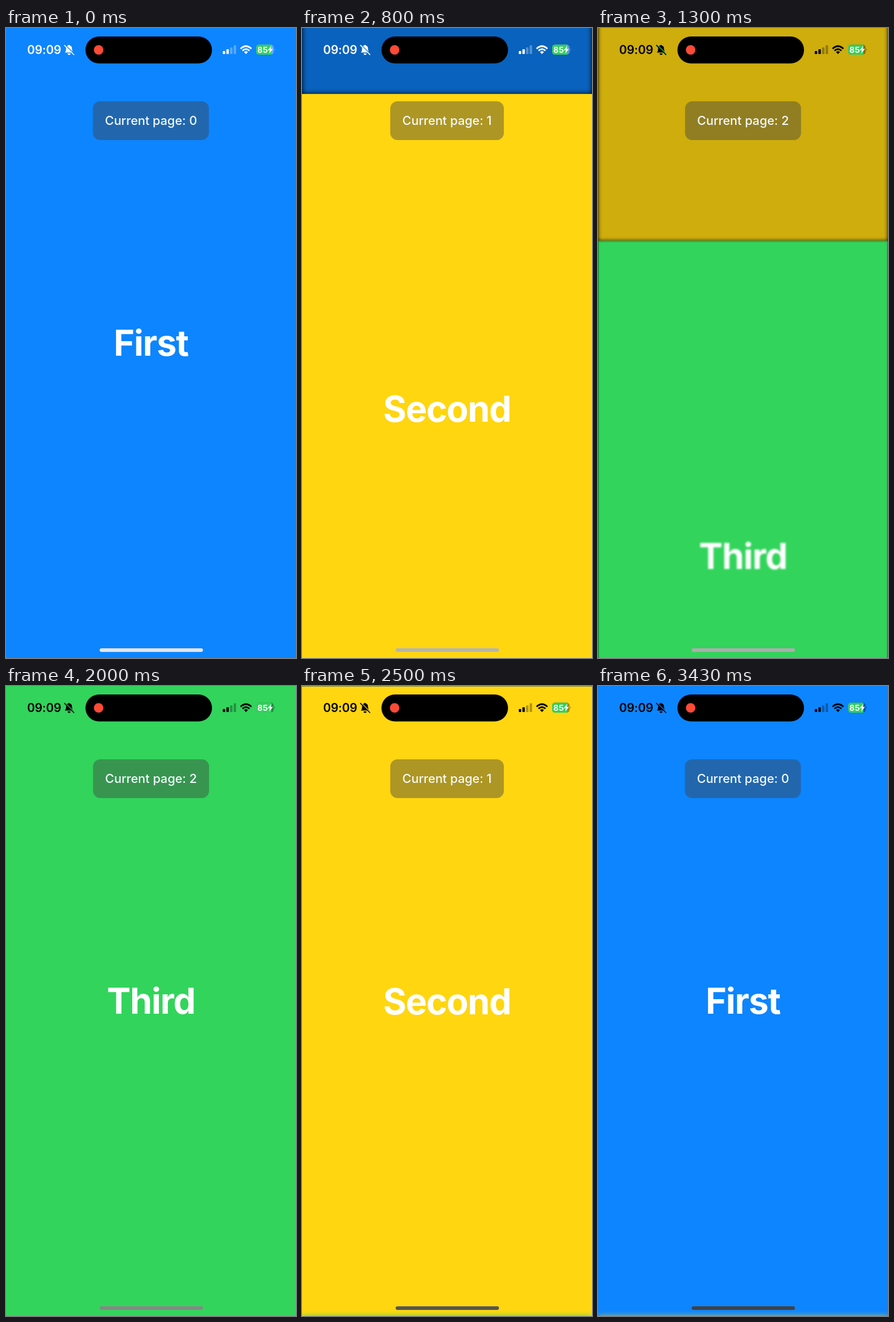
Animation of 480x1040 px, one loop 3570 ms. Source, as an HTML page:

```html
<!DOCTYPE html>
<html lang="en">
<head>
<meta charset="utf-8">
<title>Vertical pager</title>
<style>
  html, body { margin: 0; width: 100%; height: 100%; overflow: hidden; background: #000; }
  body { position: relative; font-family: Inter, "Open Sans", sans-serif; }
  .page {
    position: absolute; left: 0; top: 0; width: 480px; height: 1040px;
    color: #fff; font-size: 59px; font-weight: 700; letter-spacing: -1.2px;
    line-height: 1040px; text-align: center;
  }
  #label {
    position: absolute; left: 50%; top: 121px; height: 64px; padding: 0 20px;
    transform: translateX(-50%); border-radius: 12px;
    background: rgba(65, 65, 65, .426); color: #f4faff;
    font-size: 20.3px; font-weight: 500; line-height: 64px; white-space: nowrap;
  }
  svg { position: absolute; left: 0; top: 0; }
</style>
</head>
<body>
<div class="page" style="background:#0d85ff">First</div>
<div class="page" style="background:#ffd610">Second</div>
<div class="page" style="background:#32d45c">Third</div>
<div id="label"></div>

<svg width="480" height="1040">
  <rect x="131.5" y="14" width="209.5" height="44.5" rx="22.2"/>
  <circle cx="153.3" cy="36.2" r="7.9" fill="#fb4a36"/>

  <g id="status">
    <text x="63.2" y="43" font-size="19.5" font-weight="600" text-anchor="middle" letter-spacing="-.1">09:09</text>
    <!-- muted bell -->
    <path d="M97.5 40.5Q99.5 38.5 99.5 34Q99.7 29.5 103 28.8Q104.3 26.6 105.6 28.8Q109 29.6 109.2 34Q109.3 38.5 111.2 40.5ZM101.8 42H107Q106.6 44.6 104.4 44.6Q102.2 44.6 101.8 42Z"/>
    <path id="gap" d="M97.6 27.8L113.4 43.2" fill="none" stroke-width="1.5"/>
    <path d="M96.8 28.6L112.4 44" fill="none" stroke="currentColor" stroke-width="1.5" stroke-linecap="round"/>
    <!-- signal -->
    <rect x="358.8" y="38" width="4" height="5" rx="1"/>
    <rect x="364.8" y="35" width="4" height="8" rx="1"/>
    <g opacity=".3">
      <rect x="370.8" y="32" width="4" height="11" rx="1"/>
      <rect x="376.8" y="28.6" width="4" height="14.4" rx="1"/>
    </g>
    <!-- wireless -->
    <g fill="none" stroke="currentColor" stroke-width="2.7">
      <path d="M388.3 34.2Q397.2 25.8 406.1 34.2"/>
      <path d="M391.5 37.5Q397.2 32.4 402.9 37.5"/>
    </g>
    <path d="M394 39.7Q397.2 37 400.4 39.7L397.2 43Z"/>
    <!-- battery -->
    <rect x="414" y="27.5" width="29" height="16.5" rx="5" opacity=".35"/>
    <path d="M444 33.5Q446 35.8 444 38Z" opacity=".4"/>
  </g>
  <path d="M419 27.5H439.3V44H419Q414 44 414 39V32.5Q414 27.5 419 27.5Z" fill="#34cf5d"/>
  <text x="424.7" y="40.7" font-size="13.5" font-weight="700" text-anchor="middle" fill="#fff">85</text>
  <path d="M439.2 29.2L433 36.8H436.8L435.6 42.2L441.8 34.6H438Z" fill="#fff"/>

  <rect id="home" x="155" y="1024" width="171" height="6" rx="3"/>
</svg>

<script>
const LOOP = 3570, H = 1040;
const pages = [...document.querySelectorAll('.page')];
const [label, status, gap, home] = ['label', 'status', 'gap', 'home'].map(id => document.getElementById(id));

// start ms, duration ms, from page, to page
const swipes = [[528, 400, 0, 1], [1097, 400, 1, 2], [2040, 380, 2, 1], [2497, 330, 1, 0]];
// time ms, grey level of the home bar
const bar = [[0, 229], [800, 181], [1300, 173], [2000, 135], [2500, 85], [2700, 80], [3430, 66], [LOOP, 66]];

const clamp = v => Math.max(0, Math.min(1, v));
const grey = v => `rgb(${v},${v},${v})`;
const ease = u => 1 - Math.pow(1 - u * u, 3.6);

function barLevel(t) {
  const i = bar.findIndex(k => k[0] > t);
  const [t0, a] = bar[i - 1], [t1, b] = bar[i];
  return a + (b - a) * (t - t0) / (t1 - t0);
}

function draw(t) {
  let pos = 0, leaving = 0;
  for (const [start, length, from, to] of swipes) {
    if (t < start) break;
    pos = from + (to - from) * ease(clamp((t - start) / length));
    leaving = from;
  }

  pages.forEach((page, i) => {
    const off = i - pos, far = Math.min(1, Math.abs(off));
    const s = page.style;
    s.transform = `translateY(${off * H}px)`;
    s.filter = far > .001 ? `blur(${5 * far}px)` : 'none';
    s.opacity = i === leaving ? 1 - .29 * far : 1;
    s.visibility = i && t < swipes[0][0] ? 'hidden' : 'visible';
  });

  const current = Math.round(pos);
  label.textContent = 'Current page: ' + current;
  const ink = grey(Math.round(255 * (1 - clamp((t - 830) / 100))));
  status.style.color = status.style.fill = ink;
  gap.style.stroke = t < 850 ? '#0a6fd6' : pages[current].style.backgroundColor;
  home.style.fill = grey(Math.round(barLevel(t)));
}

const begin = performance.now();
function tick() {
  draw((performance.now() - begin) % LOOP);
  requestAnimationFrame(tick);
}
tick();
</script>
</body>
</html>
```
